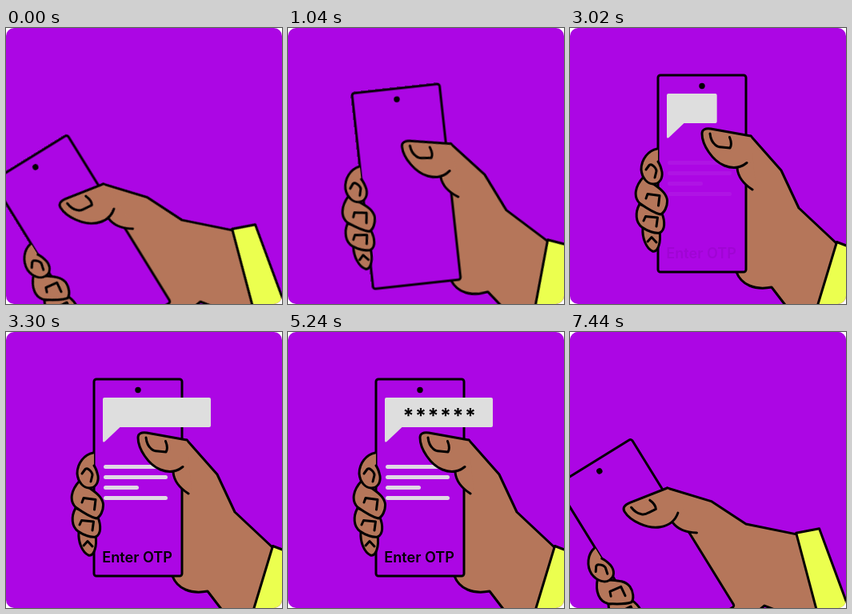
An HTML page for the animation above (8360 ms loop, 345 by 345 pixels).

```html
<!DOCTYPE html>
<html lang="en">
<head>
<meta charset="utf-8">
<title>Enter OTP</title>
<style>
  html, body { margin: 0; width: 100%; height: 100%; overflow: hidden; background: #fff; }
  svg { display: block; width: 100vw; height: 100vh; }
  .line { fill: none; stroke: #000; stroke-width: 3; stroke-linecap: round; stroke-linejoin: round; }
  .skin, .line.skin { fill: #b5765a; }
  .bg, .line.bg { fill: #ac06e4; }
  .line.cuff { fill: #ebff4f; }
  .bare { stroke: none; }
  .grey { fill: #dedede; }
  text { font-family: Inter, "Open Sans", sans-serif; }
  .label { font-size: 18.1px; font-weight: 600; }
  .star { font-size: 25px; font-weight: 700; text-anchor: middle; }

  .hold, .low { transform-origin: 290px 240px; }
  .low { transform: translate(-58.8px, 10.7px) rotate(-31.7deg); }
  .hold, .bubble, .body, .info, .star, .cover { animation: 8360ms linear infinite both; }
  .hold { animation-name: raise; }
  .bubble { animation-name: pop; }
  .body { animation-name: widen; }
  .info { animation-name: show; }
  .star { animation-name: drop; animation-delay: calc(var(--i) * 134ms); }
  .cover { animation-name: dissolve; }

  @keyframes raise {
    0% { transform: translate(-58.8px, 10.7px) rotate(-31.7deg); animation-timing-function: step-end; }
    9.8% { transform: translate(-53.9px, 9.8px) rotate(-29.07deg); animation-timing-function: steps(15, jump-none); }
    13.39%, 100% { transform: translate(0, 0) rotate(0deg); }
  }
  @keyframes pop {
    0% { opacity: 0; }
    22.72% { opacity: 0; animation-timing-function: steps(15); }
    26.31%, 100% { opacity: 1; }
  }
  @keyframes widen {
    0% { width: 57.5px; }
    35.88% { width: 57.5px; animation-timing-function: steps(15); }
    39.47%, 100% { width: 135px; }
  }
  @keyframes show {
    0% { opacity: 0; }
    35.88% { opacity: 0; animation-timing-function: steps(15); }
    39.47%, 100% { opacity: 1; }
  }
  @keyframes drop {
    0%, 49.28% { opacity: 0; transform: translateY(-12px); }
    54.66%, 89.5% { opacity: 1; transform: translateY(0); }
    89.6%, 100% { opacity: 0; transform: translateY(0); }
  }
  @keyframes dissolve {
    0% { opacity: 0; }
    86.6% { opacity: 0; animation-timing-function: steps(10); }
    88.99%, 100% { opacity: 1; }
  }
</style>
</head>
<body>
<svg viewBox="0 0 345 345" preserveAspectRatio="none">
  <defs>
    <clipPath id="card"><rect width="345" height="345" rx="10"/></clipPath>

    <g id="back">
      <path class="skin" d="M208 305C214 321 231 328 252 324L298 384L334 270L286 225L264 178L226 135L200 160V305Z"/>
      <path class="line" d="M208 305C214 321 231 328 252 324L298 384M226 135L264 178L286 225L334 270"/>
      <path class="line cuff" d="M333.500 267.500L361 278L338 392L297 388Z"/>
      <rect class="line bg" x="110" y="59" width="110" height="246" rx="3"/>
      <circle cx="165" cy="72.500" r="3.700"/>
    </g>

    <g id="front">
      <!-- fingers, lowest first -->
      <g class="line">
        <path class="skin" d="M91 250C90 262 95 275 103 279C110 281 114 268 112 254Z"/>
        <path class="skin" d="M87 220C81 231 82 243 90 249C97 254 106 257 112 256C119 253 119 242 115 232Z"/>
        <path class="skin" d="M92 186C81 198 79 211 87 219C94 224 104 231 113 233C118 231 122 223 121.500 215C120 205 111 200 103 194Z"/>
        <path class="skin bare" d="M110 151C98 153 89 164 89 177C90 188 97 195 104 195C112 195 116 188 115 180Q113 171 110 167Z"/>
        <path d="M109 151C98 153 89 164 89 177C90 188 97 195 104 195C112 195 116 188 115 180Q113 171 110 167"/>
        <path d="M95 177L99 171.500Q101 170 103 171.500Q108 175 108 179L106 187M95 213L97 207.500L112 209.500L110.500 222M92 241L94.500 235.500L109.500 237L108 248M97 267L102 261.500L108 268"/>
      </g>
      <!-- thumb -->
      <path class="skin" d="M226 135L176 126C169 125 165 127 165 132C165 146 178 166 193 172Q202 175 209 175C210 185 215 192 221 197H232Z"/>
      <path class="line" d="M226 135L176 126C169 125 165 127 165 132C165 146 178 166 193 172C203 176 213 175 221 168.500M209 175C210 187 217 195 228 202M175 132Q176 141 181 145.500Q184 149 190 149L200 150Q203 145 199.500 136.500"/>
    </g>
  </defs>

  <g clip-path="url(#card)">
    <rect class="bg" width="345" height="345"/>
    <g class="hold">
      <use href="#back"/>
      <g class="info">
        <path d="M124.500 168.500H199M124.500 181.500H199.500M124.500 194.500H163.500M124.500 207.500H199.500" stroke="#e0dae4" stroke-width="5" stroke-linecap="round"/>
        <text class="label" x="120.300" y="288">Enter OTP</text>
      </g>
      <use href="#front"/>
    </g>

    <g class="bubble grey">
      <rect class="body" x="121" y="82" width="57.500" height="37" rx="2"/>
      <path d="M121 116V136Q121 138.500 123.500 137L142.500 119V116Z"/>
    </g>
    <g>
      <text class="star" style="--i:0" x="150.500" y="114">*</text>
      <text class="star" style="--i:1" x="166" y="114">*</text>
      <text class="star" style="--i:2" x="181.500" y="114">*</text>
      <text class="star" style="--i:3" x="197" y="114">*</text>
      <text class="star" style="--i:4" x="212.500" y="114">*</text>
      <text class="star" style="--i:5" x="228" y="114">*</text>
    </g>

    <g class="cover">
      <rect class="bg" width="345" height="345"/>
      <g class="low"><use href="#back"/><use href="#front"/></g>
    </g>
  </g>
</svg>
</body>
</html>
```
